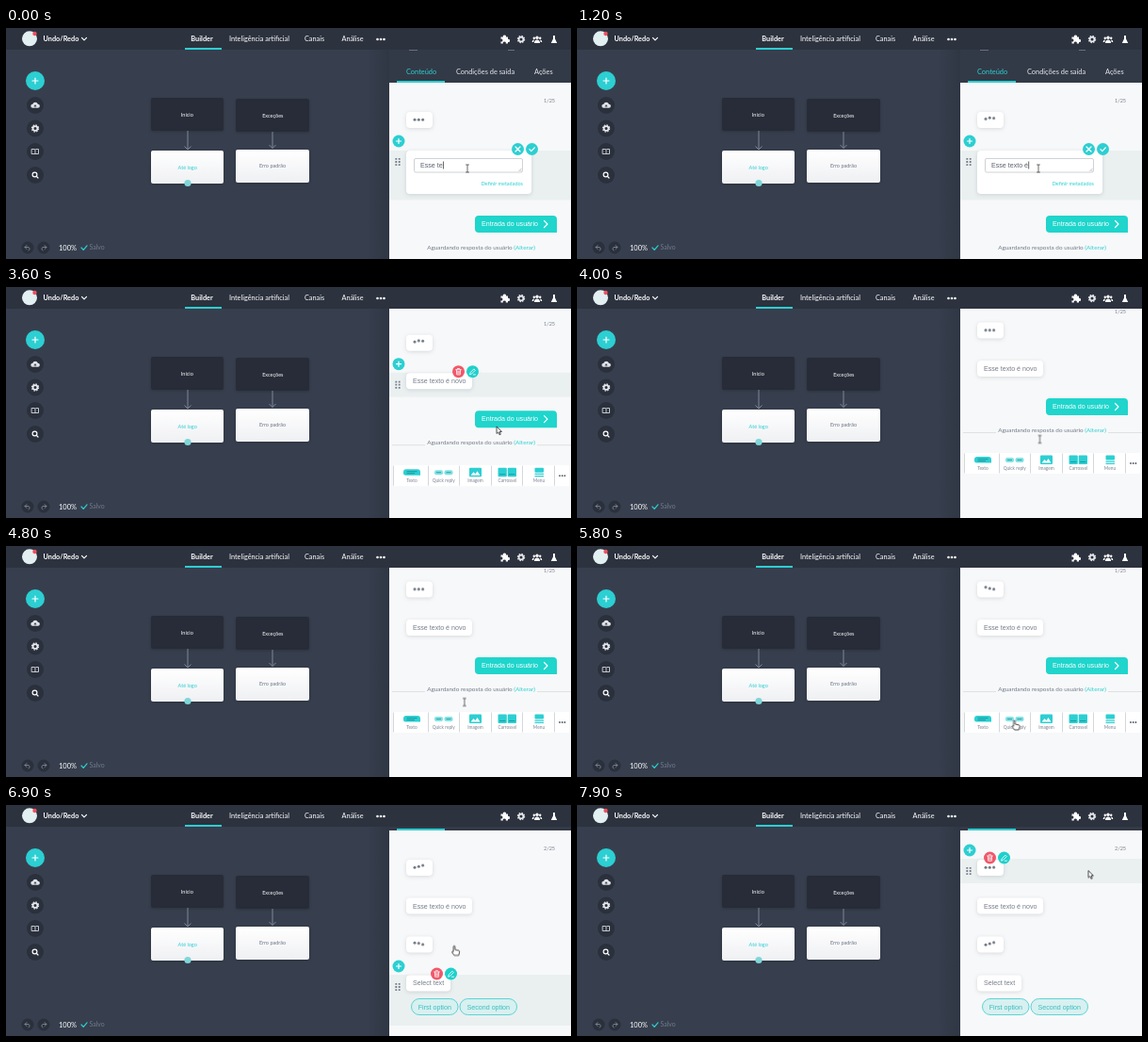
These frames come from a looping animation (600 by 245 pixels, 8 s). An HTML page:

```html
<!DOCTYPE html>
<html lang="pt">
<head>
<meta charset="utf-8">
<title>Builder</title>
<style>
  html, body { margin: 0; width: 100%; height: 100%; overflow: hidden; background: #373f4e; }
  svg { display: block; width: 600px; height: 245px; font: 7.3px Lato, "Open Sans", sans-serif; }
  .mid { text-anchor: middle; }
  .chat { font: 7.1px "Liberation Sans", Arial, sans-serif; fill: #757d8a; white-space: pre; }
  .teal { fill: #2ccfd2; }
  .dark { fill: #2a303c; }
  .line { fill: none; stroke: #fff; stroke-width: 1.2; stroke-linecap: round; stroke-linejoin: round; }
  .thin { stroke-width: .8; }
  .soft { stroke: #d5d8de; stroke-width: .9; }
  .bubble { fill: #fff; filter: drop-shadow(0 1px 2px #28324628); }
  .node { filter: drop-shadow(0 1px 1.5px #0003); }
  .row { fill: #eaf0f0; }
  .small { font-size: 5.5px; }
  .tiny { font-size: 4.8px; fill: #7b8492; }
  .pill { fill: #d8f0f0; stroke: #4fd0d3; stroke-width: .9; }
  .ibeam { fill: none; stroke: #444; stroke-width: .8; }

  #scroll { animation: scroll 8s infinite; }
  @keyframes scroll {
    0%, 42.5% { transform: none; }
    48.125%, 80.625% { transform: translateY(-51.5px); }
    85%, 100% { transform: translateY(-31px); }
  }
  #pointer { animation: pointer 8s ease-in-out infinite; }
  @keyframes pointer {
    0%, 23.75% { transform: translate(490px, 149px); }
    33.75%, 40.625% { transform: translate(560px, 130px); }
    48.75%, 57.5% { transform: translate(491.5px, 161.5px); }
    66.25%, 78.75% { transform: translate(464.5px, 185px); }
    83.75%, 89.375% { transform: translate(476px, 149.5px); }
    96.25%, 100% { transform: translate(543px, 69.5px); }
  }
  .dots { --start: 0s; fill: #737b87; }
  .late { --start: -.58s; }
  .dots circle { animation: wave .8s linear var(--start) infinite; }
  .dots circle:nth-child(2) { animation-delay: calc(var(--start) + .12s); }
  .dots circle:nth-child(3) { animation-delay: calc(var(--start) + .24s); }
  @keyframes wave {
    0%, 60%, 100% { transform: none; }
    30% { transform: translateY(-2.5px); }
  }
</style>
</head>
<body>
<svg viewBox="0 0 600 245">
  <defs>
    <clipPath id="panelClip"><rect x="407" y="23" width="193" height="222"/></clipPath>
    <linearGradient id="paper" x2="0" y2="1"><stop stop-color="#fff"/><stop offset="1" stop-color="#eff0f3"/></linearGradient>
    <linearGradient id="edge"><stop stop-color="#1c222d" stop-opacity="0"/><stop offset="1" stop-color="#1c222d" stop-opacity=".3"/></linearGradient>
    <g id="gear">
      <circle r="2.4" fill="none" stroke="#e6e9ed" stroke-width="1.7"/>
      <circle r="3.6" fill="none" stroke="#e6e9ed" stroke-width="1.2" stroke-dasharray="1.5 1.327"/>
    </g>
    <g id="add">
      <circle r="6.5" class="teal"/>
      <path d="M-2.5 0H2.5M0-2.5V2.5" class="line"/>
    </g>
    <path id="handle" fill="#737c89" d="M-2.6-4h1.8v1.8h-1.8zM.8-4h1.8v1.8H.8zM-2.6-.9h1.8V.9h-1.8zM.8-.9h1.8V.9H.8zM-2.6 2.2h1.8V4h-1.8zM.8 2.2h1.8V4H.8z"/>
    <g id="trash">
      <circle r="6.5" fill="#f0586a"/>
      <path d="M-2.8-2H2.8M-1-3.2H1M-2.1-2L-1.8 3.2H1.8L2.1-2M-.6-.4V1.8M.6-.4V1.8" class="line thin"/>
    </g>
    <g id="pencil">
      <circle r="6.5" fill="#1fd0cb"/>
      <path d="M-2.8 2.8L-2.2.8 1.4-2.8 2.8-1.4-.8 2.2ZM.8 3.2H3" class="line thin"/>
    </g>
    <g id="reply">
      <path d="M502 199H581a4 4 0 0 1 4 4V217H502a4 4 0 0 1-4-4V203a4 4 0 0 1 4-4z" fill="#1fd5cc"/>
      <text x="505" y="210.3" class="chat" style="fill:#fff">Entrada do usuário</text>
      <path d="M571.5 204.5L575 208 571.5 211.5" class="line"/>
      <text x="504.5" y="235.3" class="mid" font-size="6.4" fill="#717a88">Aguardando resposta do usuário <tspan class="teal">(Alterar)</tspan></text>
    </g>
    <g id="dotRow"><circle cx="434" cy="97" r="1.4"/><circle cx="438" cy="97" r="1.4"/><circle cx="442" cy="97" r="1.4"/></g>
    <path id="arrow" d="M0 0V7.5L1.8 6 3 8.8 4.3 8.2 3.1 5.5H5.4z"/>
    <path id="ibeam" d="M-1.8-4H1.8M0-4V4M-1.8 4H1.8"/>
  </defs>

  <rect width="600" height="245" fill="#373f4e"/>

  <!-- flow nodes -->
  <g class="node">
    <rect x="154" y="74" width="77" height="35" rx="2" fill="#272c38"/>
    <rect x="244" y="75" width="78" height="35" rx="2" fill="#272c38"/>
    <rect x="154" y="130" width="77" height="35" rx="2" fill="url(#paper)"/>
    <rect x="244" y="129" width="78" height="35" rx="2" fill="url(#paper)"/>
  </g>
  <path d="M193 109V129M189.5 125.5L193 129 196.5 125.5M283 110V127.5M279.5 124L283 127.500 286.5 124" fill="none" stroke="#7f8898"/>
  <g class="mid small" fill="#fff">
    <text x="192.3" y="93.7">Início</text>
    <text x="283.3" y="95">Exceções</text>
    <text x="192.7" y="150" class="teal">Até logo</text>
    <text x="283" y="148.3" fill="#6c7686">Erro padrão</text>
  </g>
  <circle cx="193" cy="164.5" r="3.6" fill="#7fd6d8"/>

  <!-- tool buttons -->
  <g class="dark">
    <circle cx="31" cy="56" r="10" class="teal"/>
    <circle cx="31" cy="82" r="9"/><circle cx="31" cy="106.5" r="9"/>
    <circle cx="31" cy="131" r="9"/><circle cx="31" cy="156" r="9"/>
    <circle cx="23" cy="233" r="6.5"/><circle cx="40" cy="233" r="6.5"/>
  </g>
  <path d="M28 56H34M31 53V59" class="line"/>
  <path d="M28.3 84.700a2 2 0 0 1 0-4 3 3 0 0 1 5.600 0 2 2 0 0 1 0 4z" fill="#e0e3e8"/>
  <path d="M31 84V82M30 82.900L31 81.900 32 82.900" class="line thin" style="stroke:#2a303c"/>
  <use href="#gear" x="31" y="106.5"/>
  <path d="M27.5 128.5H30.3L31 129.2 31.7 128.5H34.5V133.500H27.5zM31 129.2V133.5" class="line soft"/>
  <path d="M32.500 157.500L34 159" class="line"/>
  <circle cx="30.500" cy="155.500" r="2.400" class="line"/>
  <path d="M22 230.5L20 232.5 22 234.5M20.2 232.5H24a2 2 0 0 1 0 3.5M41 230.5L43 232.5 41 234.5M42.8 232.5H39a2 2 0 0 0 0 3.5" class="line thin" style="stroke:#8b94a3"/>
  <text x="56" y="235.6" font-size="7.5" fill="#fff">100%</text>
  <path d="M80 233L82.2 235.3 86 230.8" class="line" style="stroke:#2ccfd2"/>
  <text x="88.5" y="235.3" font-size="6.9" fill="#6f7a8b">Salvo</text>

  <!-- side panel -->
  <rect x="383" y="23" width="24" height="222" fill="url(#edge)"/>
  <g clip-path="url(#panelClip)">
    <rect x="407" y="23" width="193" height="222" fill="#f7f8f9"/>
    <g id="scroll">
      <rect x="407" y="-40" width="193" height="98" fill="#333a47"/>
      <path d="M428 23.500H437M533 23.500H540" stroke="#8c95a3" stroke-width=".6"/>
      <g fill="#e6e9ee" font-size="7.400">
        <text x="425" y="48.700" class="teal">Conteúdo</text>
        <text x="478" y="48.700">Condições de saída</text>
        <text x="561" y="48.700">Ações</text>
      </g>
      <rect x="415" y="56" width="51" height="2" class="teal"/>
      <g class="mid small" fill="#7b8492">
        <text x="577" y="79" data-on="0-6100">1/25</text>
        <text x="577" y="79" data-on="6100-8000">2/25</text>
      </g>
      <g id="rows"></g>

      <rect x="425" y="89" width="28" height="17" rx="4" class="bubble"/>
      <g class="dots"><circle cx="434" cy="97.200" r="1.500"/><circle cx="438.300" cy="97.200" r="1.500"/><circle cx="442.600" cy="97.200" r="1.500"/></g>

      <g data-on="0-3200">
        <rect x="407" y="130" width="193" height="52.500" class="row"/>
        <use href="#add" x="417" y="120"/>
        <use href="#handle" x="416" y="142"/>
        <rect x="425" y="130" width="133" height="46" rx="4" class="bubble"/>
        <rect x="433.500" y="138.500" width="115" height="14.500" rx="1.500" fill="#fff" stroke="#c3c7cc" stroke-width=".8"/>
        <path d="M544.500 152L547.500 149M546.500 152L547.500 151" stroke="#999" stroke-width=".6"/>
        <text id="typed" x="440" y="148" class="chat" style="fill:#59616d"></text>
        <rect id="caret" y="141.500" width=".8" height="8" fill="#444" data-on="0-2350"/>
        <text x="549" y="166.600" text-anchor="end" class="small teal">Definir metadados</text>
        <circle cx="543.500" cy="128.500" r="6.500" class="teal"/>
        <circle cx="558.500" cy="128.500" r="6.500" class="teal"/>
        <circle cx="558.500" cy="128.500" r="6.500" fill="#23898f" data-on="2500-3200"/>
        <path d="M541 126L546 131M546 126L541 131M555.900 128.700L557.800 130.600 561.300 126.800" class="line"/>
        <use href="#reply"/>
      </g>

      <g data-on="3200-8000">
        <rect x="425" y="129.500" width="70" height="17" rx="4" class="bubble"/>
        <text x="432" y="140.500" class="chat">Esse texto é novo</text>
      </g>

      <g data-on="3200-6100">
        <use href="#reply" y="-29.500"/>
        <path d="M410 206H445M564 206H600" stroke="#d3d7dc" stroke-width=".7"/>
        <rect x="411" y="227.500" width="187" height="22" fill="#fff"/>
        <path d="M411.500 228V249M448.500 228V249M481.500 228V249M515.500 228V249M548.500 228V249M582.500 228V249" stroke="#c9ced5" stroke-width=".8"/>
        <g class="teal">
          <path d="M425 231.500H437a3 3 0 0 1 3 3V238H424.500a2.500 2.500 0 0 1-2.500-2.500V234.500a3 3 0 0 1 3-3z"/>
          <rect x="455" y="232.500" width="9" height="5" rx="2" opacity=".6"/>
          <rect x="465.500" y="232.500" width="9" height="5" rx="2" opacity=".6"/>
          <rect x="492" y="230" width="13" height="9.500" rx="1"/>
          <rect x="522.500" y="230" width="9.300" height="9.500" rx="1"/>
          <rect x="532.700" y="230" width="9.300" height="9.500" rx="1"/>
          <rect x="561.500" y="230" width="9.500" height="5" rx="1"/>
          <path d="M561.500 236H571V237.300H561.500zM561.500 238.300H571V239.600H561.500z"/>
        </g>
        <path d="M493.500 238L496.500 234.500 498.500 236.500 500.500 233.500 503.500 238z" fill="#fff"/>
        <path d="M425.500 234H436.500M425.500 236H434M457 235H462M467.500 235H472.500M524 237H530.500M534 237H540.500" stroke="#14858a" stroke-width=".7"/>
        <g class="mid tiny">
          <text x="431" y="245.500">Texto</text><text x="464.700" y="245.500">Quick reply</text>
          <text x="498.500" y="245.500">Imagem</text><text x="532.300" y="245.500">Carrossel</text>
          <text x="566" y="245.500">Menu</text>
        </g>
        <g fill="#4f5865"><circle cx="588" cy="238.500" r=".9"/><circle cx="590.700" cy="238.500" r=".9"/><circle cx="593.400" cy="238.500" r=".9"/></g>
      </g>

      <g data-on="6100-8000">
        <rect x="425" y="170.500" width="28" height="17" rx="4" class="bubble"/>
        <g class="dots late"><circle cx="434" cy="179.200" r="1.500"/><circle cx="438.300" cy="179.200" r="1.500"/><circle cx="442.600" cy="179.200" r="1.500"/></g>
        <rect x="425" y="211.500" width="47" height="17" rx="4" class="bubble"/>
        <text x="432" y="222" class="chat">Select text</text>
        <rect x="430.500" y="236.500" width="49.500" height="17" rx="8.500" class="pill"/>
        <rect x="482" y="236.500" width="60.500" height="17" rx="8.500" class="pill"/>
        <g class="mid">
          <text x="455.300" y="247.500" class="chat" style="fill:#35bdc0">First option</text>
          <text x="512.300" y="247.500" class="chat" style="fill:#35bdc0">Second option</text>
        </g>
        <use href="#reply" y="78"/>
      </g>
      <g id="controls"></g>
    </g>
  </g>

  <!-- top bar -->
  <rect width="600" height="23" fill="#2c323e"/>
  <circle cx="25" cy="11.300" r="8" fill="#e3f0f1"/>
  <circle cx="30.500" cy="6" r="2.200" fill="#f0505f"/>
  <g fill="#fff">
    <text x="39.500" y="14" font-weight="700">Undo/Redo</text>
    <text x="208" y="14" class="mid" font-weight="700">Builder</text>
    <text x="237" y="14">Inteligência artificial</text>
    <text x="317" y="14">Canais</text>
    <text x="356.500" y="14">Análise</text>
    <circle cx="394.500" cy="12" r="1.300"/><circle cx="398" cy="12" r="1.300"/><circle cx="401.500" cy="12" r="1.300"/>
    <path d="M525.500 9.500H528a1.500 1.500 0 1 1 2.800 0H533V12a1.500 1.500 0 1 1 0 2.800V16.500H530.700a1.500 1.500 0 1 0-2.800 0H525.500V14.300a1.400 1.400 0 1 0 0-2.600z"/>
    <circle cx="564" cy="10.300" r="1.700"/><circle cx="560.800" cy="10.700" r="1.200"/><circle cx="567.200" cy="10.700" r="1.200"/>
    <path d="M561 16a3 3.500 0 0 1 6 0zM558.700 15a2.200 2.500 0 0 1 2.300-2.600l-.8 2.600zM569.300 15a2.200 2.500 0 0 0-2.300-2.600l.8 2.600z"/>
    <path d="M581 8H583V11.500L585.200 16H578.800L581 11.500z"/>
  </g>
  <use href="#gear" x="547" y="12"/>
  <path d="M80.500 10.300L83 12.800 85.500 10.300" class="line"/>
  <rect x="190" y="21" width="39" height="2" class="teal"/>

  <g id="pointer">
    <use href="#ibeam" class="ibeam" data-on="0-2000"/>
    <use href="#ibeam" class="ibeam" data-on="3600-4850"/>
    <g fill="#fff" stroke="#222" stroke-width=".8" stroke-linejoin="round">
      <use href="#arrow" data-on="2000-3600"/>
      <path data-on="4850-7200" d="M-.9.800a.9.900 0 0 1 1.800 0V4L5 4.900Q5.800 5.300 5.600 6.500L4.800 10H0L-2.600 6.500Q-2.500 5.300-.9 6.200z"/>
      <use href="#arrow" data-on="7200-8000"/>
    </g>
  </g>
</svg>
<script>
  const byId = id => document.getElementById(id);

  // Hovered message: visible span, top, height, right edge of its bubble
  const hovers = [
    ['3200-3600', 129, 26, 495],
    ['6100-7200', 211, 54, 472],
    ['7200-7350', 170, 26, 453],
    ['7350-7550', 129, 26, 495],
    ['7550-8000', 88, 26, 453],
  ];
  byId('rows').innerHTML = hovers.map(([on, top, height]) =>
    `<rect class="row" data-on="${on}" x="407" y="${top}" width="193" height="${height}"/>`).join('');
  byId('controls').innerHTML = hovers.map(([on, top, , right]) => `<g data-on="${on}">
    <use href="#add" x="417" y="${top - 9}"/><use href="#handle" x="416" y="${top + 13}"/>
    <use href="#trash" x="${right - 14.5}" y="${top - 1}"/><use href="#pencil" x="${right + .5}" y="${top - 1}"/></g>`).join('');

  const message = 'Esse texto é novo';
  const keyTimes = [200, 400, 600, 800, 1100, 1300, 1450, 1550, 1650, 1750];
  const parts = [...document.querySelectorAll('[data-on]')].map(el => [el, ...el.dataset.on.split('-').map(Number)]);
  const typed = byId('typed');
  const clock = byId('scroll').getAnimations()[0];

  function draw() {
    const t = (clock.currentTime ?? 0) % 8000;
    for (const [el, from, to] of parts) el.style.visibility = t >= from && t < to ? '' : 'hidden';
    typed.textContent = message.slice(0, 7 + keyTimes.filter(k => k <= t).length);
    byId('caret').setAttribute('x', 440.3 + typed.getComputedTextLength());
    requestAnimationFrame(draw);
  }
  draw();
</script>
</body>
</html>
```
